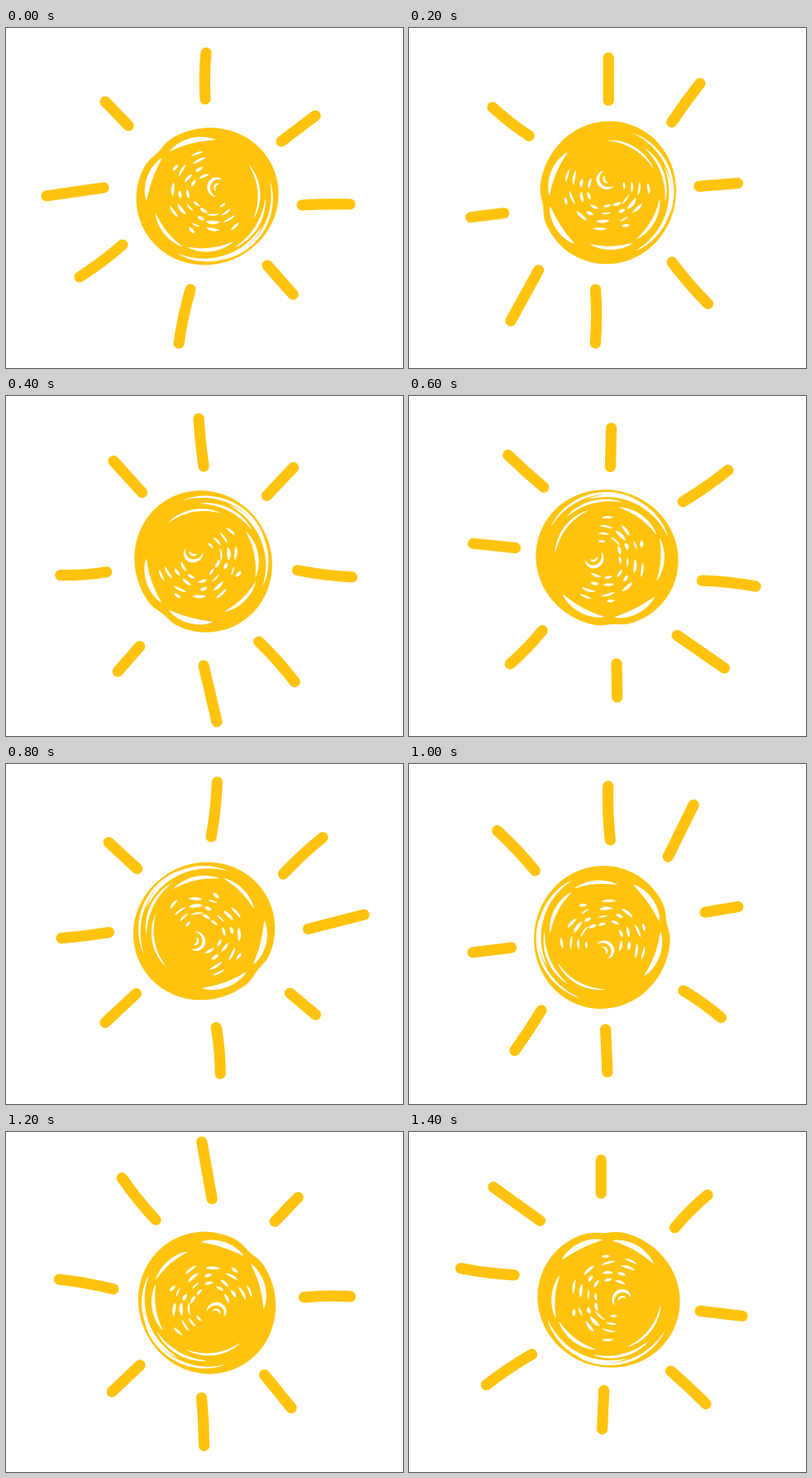
Write an HTML page that moves like this. It is 480 px wide and 411 px high and loops after 1.6 s.

```html
<!DOCTYPE html>
<html lang="en">
<head>
<meta charset="utf-8">
<title>Sun</title>
<style>
  html, body { margin: 0; width: 100%; height: 100%; overflow: hidden; background: #fff; }
  svg { display: block; width: 100vw; height: 100vh; }
  .ray { fill: none; stroke: #ffc30d; stroke-width: 13.2; stroke-linecap: round; }
  .disc { fill: #ffc30d; }
  .gap { fill: #fff; }
</style>
</head>
<body>
<svg viewBox="0 0 480 411"><g id="sun"></g></svg>
<script>
const STEP = 200;
const sun = document.getElementById('sun');
const rad = d => d * Math.PI / 180;
const point = (r, deg, cx = 0, cy = 0) =>
  (cx + r * Math.cos(rad(deg))).toFixed(2) + ' ' + (cy + r * Math.sin(rad(deg))).toFixed(2);

let seed = 11;
const rand = (lo, hi) => {
  seed = seed * 16807 % 2147483647;
  return lo + (hi - lo) * seed / 2147483647;
};

function add(cls, d) {
  const el = document.createElementNS('http://www.w3.org/2000/svg', 'path');
  el.setAttribute('class', cls);
  el.setAttribute('d', d);
  sun.append(el);
}

// From the inner to the outer end, bowed sideways by a few pixels
function ray(x1, y1, x2, y2, bow = 0) {
  const k = bow * 2.4 / Math.hypot(x2 - x1, y2 - y1);
  const mx = (x1 + x2) / 2 - (y2 - y1) * k;
  const my = (y1 + y2) / 2 + (x2 - x1) * k;
  add('ray', `M${x1} ${y1}Q${mx} ${my} ${x2} ${y2}`);
}

// Slightly oval with one dent
function disc() {
  const pts = [];
  for (let a = 0; a < 360; a += 4) {
    const dent = 3 * Math.exp(-(((a - 222) / 9) ** 2));
    pts.push(point(84.4 + 2.2 * Math.cos(rad(2 * (a - 157))) - dent, a));
  }
  add('disc', 'M' + pts.join('L') + 'Z');
}

// Tapered white arc left between two scribbled strokes
function gap(r0, r1, a0, a1, width, cx = 0, cy = 0) {
  const rim = [], back = [], n = 16;
  for (let i = 0; i <= n; i++) {
    const t = i / n, a = a0 + (a1 - a0) * t, r = r0 + (r1 - r0) * t;
    const h = width / 2 * Math.sin(Math.PI * t) ** 0.7;
    rim.push(point(r + h, a, cx, cy));
    back.unshift(point(r - h, a, cx, cy));
  }
  add('gap', 'M' + rim.concat(back).join('L') + 'Z');
}

ray(-2.5, -117.5, -1.5, -173.5, -1);
ray(89.5, -66.5, 130.5, -97.5);
ray(114.5, 10.5, 172.5, 9.5, -0.5);
ray(72.5, 83.5, 103.5, 118.5);
ray(-20.5, 112.5, -34.5, 177.5, 1);
ray(-102.5, 58.5, -154.5, 97.5, -1);
ray(-125.5, -10.5, -194.5, -0.5);
ray(-95.5, -85.5, -123.5, -114.5);

disc();
gap(78, 79, -15, 75, 3.2);
gap(75, 78, 28, 118, 4.4);
gap(70, 70, 2, 62, 3.4);
gap(63, 66, 60, 112, 4.6);
gap(68, 66, 116, 162, 4.4);
gap(74, 72, 176, 220, 7);
gap(71, 69, 230, 278, 6.5);
gap(63, 62, -38, 26, 3);

// Short marks scattered on the side away from the solid part
for (let i = 0; i < 26; i++) {
  const r = 20 + i * 1.35, a = 35 + i * 97 % 225, span = rand(500, 1000) / r;
  gap(r, r + rand(-3, 3), a, a + Math.min(span, 34), rand(2, 4.6), 5, -4);
}

// Curl in the middle
gap(13, 9, 100, 300, 4, 13, -12);
gap(6, 4, 130, 270, 2.6, 14, -11);

// Disc centre and turn, about an eighth to the left each time
const poses = [
  [243.5, 203.5, 0], [240.5, 199, -53], [238.5, 200, -95], [239.5, 196, -137],
  [239.5, 202, -186], [233.5, 209.5, -235.5], [243, 206.5, -272], [241.5, 202, -316]
];

const start = performance.now();
function draw() {
  const t = Math.max(0, performance.now() - start);
  const [x, y, turn] = poses[Math.floor(t / STEP) % poses.length];
  sun.setAttribute('transform', `translate(${x} ${y}) rotate(${turn})`);
  requestAnimationFrame(draw);
}
draw();
</script>
</body>
</html>
```
